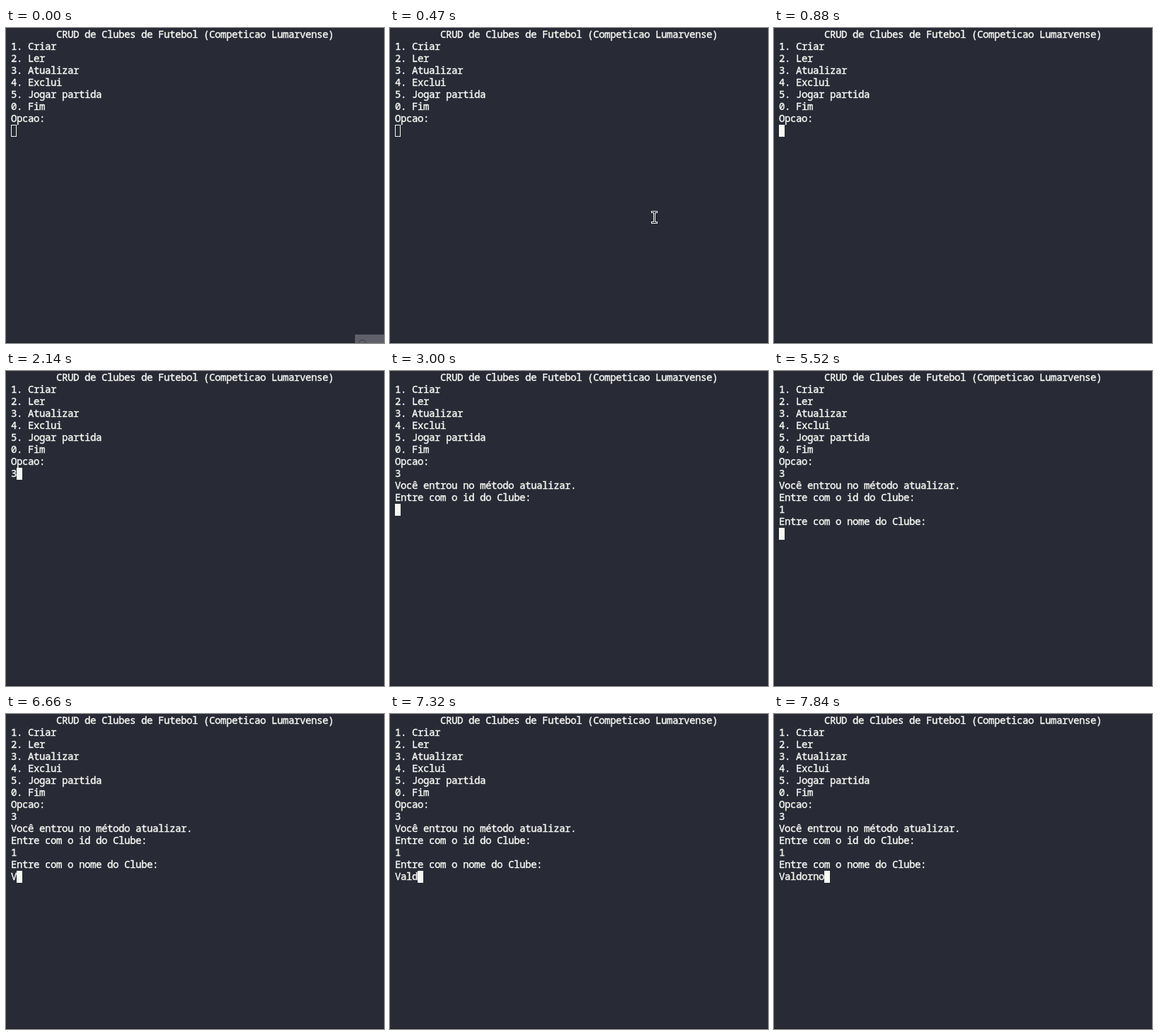
An HTML page that plays this animation: 534x446 px, repeating every 8000 ms.

```html
<!DOCTYPE html>
<html lang="pt">
<head>
<meta charset="utf-8">
<title>Terminal</title>
<style>
  html, body { margin: 0; width: 100%; height: 100%; overflow: hidden; background: #282a36; }
  svg { display: block; width: 534px; height: 446px; }
  text {
    font: 500 14px "Noto Sans Mono", "DejaVu Sans Mono", monospace;
    letter-spacing: -.4px; white-space: pre;
    fill: #f8f8f2; stroke: #f8f8f2; stroke-width: .4px;
  }
</style>
</head>
<body>
<svg viewBox="0 0 534 446">
  <defs><path id="beam" d="M-3 -7.5H3M0 -7.5V7.5M-3 7.5H3"/></defs>
  <rect width="534" height="446" fill="#282a36"/>
  <rect y="445" width="534" height="1" fill="#1d1e28"/>
  <g id="lines"></g>
  <rect id="caret"/>
  <g id="toast">
    <rect x="493" y="434" width="41" height="12" fill="#5f606a"/>
    <path d="M499 446a4.5 4.5 0 0 1 9 0" fill="none" stroke="#484952" stroke-width="1.5"/>
  </g>
  <g id="mouse" fill="none" stroke-linecap="square">
    <use href="#beam" stroke="#fff" stroke-width="3"/>
    <use href="#beam" stroke="#0b0b10" stroke-width="1"/>
  </g>
</svg>
<script>
const LOOP = 8000, CELL = 8, ROW = 17, LEFT = 7, TOP = 1;
const $ = id => document.getElementById(id);
const club = "Valdorno";

const menu = [
  "        CRUD de Clubes de Futebol (Competicao Lumarvense)",
  "1. Criar", "2. Ler", "3. Atualizar", "4. Exclui",
  "5. Jogar partida", "0. Fim", "Opcao:"
];

// Output that follows the menu: [time, row, text]
const prints = [
  [2140, 8, "3"],
  [3000, 9, "Você entrou no método atualizar."],
  [3000, 10, "Entre com o id do Clube:"],
  [4520, 11, "1"],
  [5520, 12, "Entre com o nome do Clube:"]
];

// Caret: [time, row, column]
const caretSteps = [
  [0, 8, 0], [2140, 8, 1], [2930, 9, 0], [3000, 11, 0],
  [4520, 11, 1], [5450, 12, 0], [5520, 13, 0]
];

// Pointer: [time, x, y]; no position means hidden
const mouseSteps = [
  [0], [330, 463.5, 339], [400, 412.5, 298], [470, 373.5, 268],
  [810, 383.5, 265], [880]
];

const last = (steps, t) => steps.filter(s => s[0] <= t).pop();

function addLine(row, text) {
  const el = document.createElementNS("http://www.w3.org/2000/svg", "text");
  const body = text.trimStart();
  el.setAttribute("x", LEFT + (text.length - body.length) * CELL);
  el.setAttribute("y", TOP + row * ROW + 13);
  el.textContent = body;
  $("lines").append(el);
  return el;
}

function setAttrs(el, attrs) {
  for (const k in attrs) el.setAttribute(k, attrs[k]);
}

const show = (el, on) => el.setAttribute("visibility", on ? "visible" : "hidden");

menu.forEach((text, row) => addLine(row, text));
const output = prints.map(([at, row, text]) => [at, addLine(row, text)]);
const nameLine = addLine(13, "");

function typed(t) {
  if (t < 6660) return 0;
  if (t < 7060) return 1;
  return Math.min(club.length, 2 + Math.floor((t - 7060) / 130));
}

function draw(t) {
  output.forEach(([at, el]) => show(el, t >= at));

  const count = typed(t);
  nameLine.textContent = club.slice(0, count);

  const [, row, col] = last(caretSteps, t);
  const x = LEFT + (col + count) * CELL, y = TOP + row * ROW;
  setAttrs($("caret"), t < 610
    ? { x: x + .5, y: y + .5, width: 7, height: 16, fill: "none", stroke: "#f8f8f2" }
    : { x, y, width: 8, height: 17, fill: "#f8f8f2", stroke: "none" });

  show($("toast"), t < 70);

  const [, mx, my] = last(mouseSteps, t);
  show($("mouse"), mx !== undefined);
  if (mx !== undefined) $("mouse").setAttribute("transform", `translate(${mx} ${my})`);
}

const start = performance.now();
function tick() {
  draw((performance.now() - start) % LOOP);
  requestAnimationFrame(tick);
}
draw(0);
requestAnimationFrame(tick);
</script>
</body>
</html>
```
